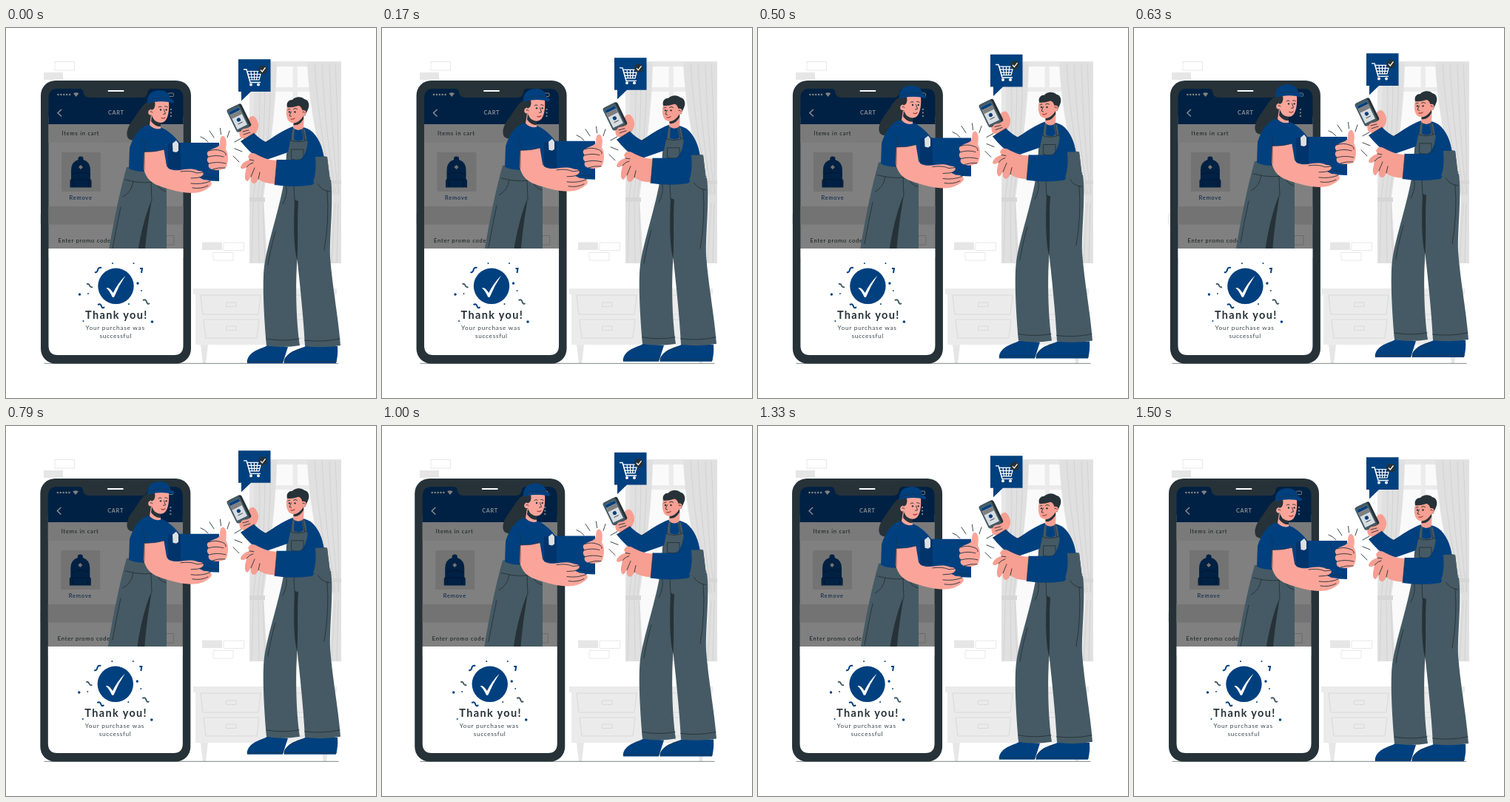
These frames come from a looping animation (500 by 500 pixels, 1540 ms). An HTML page:

```html
<!DOCTYPE html>
<html lang="en">
<head>
<meta charset="utf-8">
<title>Order complete</title>
<style>
  html, body { margin: 0; width: 100%; height: 100%; overflow: hidden; background: #fff; }
  svg { display: block; width: 100vw; height: 100vh; }
  text { font-family: Lato, "Open Sans", sans-serif; }
  .navy { fill: #00407f; }
  .dark { fill: #263238; }
  .cloth { fill: #455a64; }
  .skin { fill: #fba59a; }
  .tan { fill: #f69f92; }
  .white { fill: #fff; }
  .ink { fill: none; stroke: #263238; stroke-width: .9; stroke-linecap: round; stroke-linejoin: round; }
  .thin { stroke-width: .6; }
  .pale { fill: #fff; stroke: #e6e6e6; stroke-width: .9; }
  .drape { fill: #e0e0e0; }
  .fold { fill: none; stroke: #cfcfcf; stroke-width: .8; }
  .lip { fill: none; stroke: #a83c3a; stroke-width: 1.3; stroke-linecap: round; }
  .curl { fill: none; stroke-width: 2; stroke-linecap: butt; }
  .small { font-size: 7.5px; fill: #12191c; letter-spacing: .78px; }
  .note { font-size: 8.3px; fill: #3b474d; }
</style>
</head>
<body>
<svg viewBox="0 0 500 500" xmlns="http://www.w3.org/2000/svg">
  <!-- room -->
  <g>
    <path class="pale" d="M66 45.500H92.500V57H66ZM294 290H321.500V300.500H294ZM280 303.500H307V314H280ZM46.500 252H60V265H46.500Z"/>
    <path fill="#e6e6e6" d="M51 60H77V70H51ZM265 289.500H292V300H265Z"/>
    <path fill="#e6e6e6" d="M329 45H453V318H329Z"/>
    <path fill="#fafafa" d="M345 52H443V308H345Z"/>
    <path fill="#ebebeb" d="M387.500 52H394V308H387.500ZM345 80H443V86H345ZM337 228H345V236H337Z"/>
    <path class="drape" d="M334 46H366C365 105 357 165 348 228L353 318H329V232Q338 140 334 46Z"/>
    <path class="drape" d="M407 46H452.500V318H437L442 228C424 176 410 112 407 46Z"/>
    <path class="fold" d="M342 48Q346 150 334 230M350 48Q351 150 340 230M358 48Q357 150 345 229M334 236L332 317M341 236L342 317M347 236L350 317M417 48Q424 152 444 225M427 48Q432 150 446 225M437 48Q440 150 449 225M445 48Q449 130 450 225M445 236L440 317M449 236L447 317"/>
    <path fill="#d6d6d6" d="M329 229H350V235H329ZM440 206H453V211H440Z"/>
    <path fill="#e6e6e6" d="M263 428H273L270 453H266ZM425 428H437L433 453H429Z"/>
    <path fill="#ebebeb" d="M253 352H447V360H445V428H256V360H253Z"/>
    <path fill="none" stroke="#d9d9d9" d="M263 361H344L341 387H266ZM267 394H342L339 419H270ZM297.500 371H311V376.500H297.500ZM297.500 403H311V408.500H297.500ZM357 361H437L434 387H360ZM360 394H434L432 419H363Z"/>
    <path class="ink thin" d="M52 453.300H449"/>
  </g>

  <!-- handset -->
  <g class="shake">
    <rect class="dark" x="47" y="71" width="203" height="382.500" rx="20"/>
    <path fill="#808080" d="M57.500 120H239.500V310H57.500Z"/>
    <path fill="#002143" d="M57.500 130V95Q57.500 82 70 82H99Q104 82 104.500 87Q105.500 94 113 94H184Q190.500 94 191.500 87Q192 82 197 82H227Q239.500 82 239.500 95V130Z"/>
    <path fill="#7a7a7a" d="M57.500 130H239.500V155H57.500Z"/>
    <path fill="#737373" d="M57.500 241H239.500V265.500H57.500ZM75 168H128V221H75Z"/>
    <path d="M138.500 85H158.500" stroke="#fff" stroke-width="2" stroke-linecap="round"/>
    <path d="M70.500 90H88" stroke="#808080" stroke-width="2.600" stroke-dasharray="0 3.900" stroke-linecap="round"/>
    <path fill="#808080" d="M91 88.500Q94.700 86 98.400 88.500L94.700 93Z"/>
    <rect x="219.500" y="88" width="7" height="4.500" rx="1" fill="none" stroke="#808080"/>
    <path d="M75 110L70 114.700L75 119.500" fill="none" stroke="#8a8f96" stroke-width="1.400"/>
    <path d="M223 109V122" stroke="#808080" stroke-width="2" stroke-dasharray="2 2.500"/>
    <text x="138" y="117.300" font-size="7.300" letter-spacing=".7" fill="#8a8f96" font-weight="700">CART</text>
    <text class="small" x="75.500" y="145">Items in cart</text>
    <text class="small" x="85.500" y="231.500" style="fill:#002143">Remove</text>
    <text class="small" x="70.500" y="289.700">Enter promo code</text>
    <path fill="none" stroke="#666" stroke-width=".8" d="M190 280.500H227V293H190Z"/>
    <!-- backpack -->
    <path fill="#002143" d="M97.500 178V176Q97.500 173.500 101 173.500T104.500 176V178Q114 181 114 192V204L115.500 206V215.500H86.500V206L88 204V192Q88 181 97.500 178Z"/>
    <path d="M89 198Q101 192 113 198M88 205H114M91 207V214M111 207V214" fill="none" stroke="#001026" stroke-width=".7"/>
    <path fill="#737373" d="M101 185L104 188L101 191L98 188Z"/>
  </g>

  <!-- courier -->
  <g class="float">
    <path class="cloth" d="M163 188C154 220 145 262 137 312H217V222L215 186Z"/>
    <path class="dark" d="M197 232C188 252 180 286 177 312H187C189 282 193 256 197 232Z"/>
    <path class="ink" d="M161 205Q188 213 214 205M196 208L197 234M172 207Q170 222 158 228M204 208Q205 218 216 221M155 242Q149 270 144 298"/>
    <path class="dark" d="M196 98C186 100 180 112 173 122C165 132 161 142 165 149C172 156 195 150 204 133Z"/>
    <!-- far sleeve and torso -->
    <path class="navy" d="M208 134C218 137 228 146 235 156L219 168V188L186 194Q174 194 166 190L167 162C172 147 179 136 190 131Z"/>
    <path class="skin" d="M196 118L194 131Q200 138 209 136L209 126Z"/>
    <path class="dark" d="M197 119L196 126Q202 134 209 133V127Z"/>
    <path class="skin" d="M196 99C194 108 196 119 201 125Q207 129.500 213 127C219 124 221 111 220 99Z"/>
    <circle class="skin" cx="196" cy="114" r="3.800"/>
    <path class="dark" d="M192 100Q193 96 200 98Q203 103 200 109L197 111Q193 108 192 100Z"/>
    <path class="navy" d="M191 102C190 91 196 85 206 84.300C215 83.500 221 88 222 95L226.500 98Q228.500 100 225 101.500C214 98 202 99 191 102Z"/>
    <path class="ink thin" d="M192 98Q208 92 222 95"/>
    <path class="ink" d="M206 107Q208 105 210 106.500M214.500 106Q216.500 105 218.500 107M213.500 110L215.500 116L212.500 116.500M195 113Q196 112 198 114"/>
    <circle class="dark" cx="209" cy="110.500" r="1.200"/><circle class="dark" cx="216.700" cy="110.500" r="1.200"/>
    <path class="lip" d="M210 121.500Q212.500 123 215 121"/>

    <!-- parcel -->
    <path class="navy" d="M219 156L236 155H288V207L262 206L219 190Z"/>
    <path fill="#00346b" d="M219 156L236 155V192L219 190Z"/>
    <path fill="#dce0e4" d="M225 156L230 152L233 156V166L230 168L225.500 167Z"/>
    <path class="ink thin" d="M268 201L286 203"/>
    <path class="skin" d="M187 164L186 190C189 203 196 209 206 213C222 219 239 223 251 223C261 223 270 220 277 213C280 208 275 205 267 205L261 202C269 199 269 193 260 193C252 189 241 191 235 192C224 193 219 191 217 186L213 162Z"/>
    <path class="navy" d="M184 148L210 146L214.500 164Q201 168 186.500 167.500Z"/>
    <path class="ink thin" d="M187 191V160Q188 154 185 149M187 167.500Q201 168 214.500 164"/>
    <path class="ink" d="M236 194Q249 192 258 196L267 195M250 203Q259 203 265 201M250 210Q264 212 276 207M252 216Q264 218 273 213"/>
    <path class="skin" d="M274 166C281 161 289 162 289 155C289 149 291 145 294 146C299 149 298 158 297 164C301 169 301 182 297 189C291 193 281 193 276 190C273 188 273 184 275 183C271 181 271 176 274 174C271 171 271 168 274 166Z"/>
    <path class="ink" d="M274 166Q283 163 291 166Q298 168 297 172M274 174Q284 171 294 174M275 183Q285 180 297 183M279 191Q288 188 296 189"/>
    <path class="ink" d="M263 147Q269 149 273 154M275 139L281 148M289.500 135.500L290.500 144M302 139L299 148M309 154L318 149M309 163L319 167M307 173L315 181"/>
  </g>

  <!-- receipt card -->
  <g class="shake">
    <path class="white" d="M57.500 298H239.500V429Q239.500 442 227 442H70Q57.500 442 57.500 429Z"/>
    <circle class="navy" cx="148.500" cy="348.800" r="24.200"/>
    <path class="white" d="M135.500 351.500Q139 349 144.700 358Q151 345 161.500 334.500Q152.500 348 146 363.800H143.800Q140 355 135.500 351.500Z"/>
    <g class="curl" stroke="#00407f">
      <path d="M120 330Q123 331 124 327T129 324M181 325L184 325L183 331M124 374Q128 372 129 376T133 377"/>
    </g>
    <g class="curl" stroke="#455a64">
      <path d="M109 346Q112 345 113 348T117 350M185 368Q189 366 190 370T194 372"/>
    </g>
    <g class="navy">
      <circle cx="144" cy="318" r="1"/><circle cx="172.500" cy="318" r="1"/><circle cx="178" cy="345" r="1.700"/>
      <circle cx="99.500" cy="360" r="1.700"/><circle cx="197.500" cy="397" r="1.800"/><circle cx="166" cy="373" r="1"/>
      <circle cx="104.500" cy="396" r="1"/><circle cx="183" cy="355" r=".9"/><circle cx="111" cy="359" r=".9"/>
    </g>
    <text x="107" y="393" font-size="14.500" font-weight="700" letter-spacing="1.350" fill="#263238">Thank you!</text>
    <text class="note" x="107.500" y="408.300" letter-spacing=".75">Your purchase was</text>
    <text class="note" x="126.500" y="418.800" letter-spacing=".65">successful</text>
  </g>

  <!-- customer -->
  <g class="float">
    <path class="navy" d="M353 429C345 434 335 434 328 444Q325 449 326 453H374L381 431Z"/>
    <path class="navy" d="M405 430C396 434 384 436 378 445Q375 449 376 453H446Q449 442 448 430Z"/>
    <path class="ink thin" d="M327 450.500H374M377 450.500H447M345 434L349 439M394 434L398 439M376 453Q375 449 378 445Q386 436 400 433"/>
    <path class="cloth" d="M376 205L439 205C443 235 437 280 438 310C441 350 449 390 452 429Q428 433 404 430C402 390 397 345 393.500 312C391 348 392 395 397 429Q373 433 352 429C349 395 346 345 349 322C353 292 371 240 376 205Z"/>
    <path class="dark" d="M390 232L395 234C393 260 395 288 393.500 314C388 294 389 258 390 232Z"/>
    <path class="ink" d="M352 420Q374 424 396 420M403.500 422Q428 425 451 420M434 220Q437 260 430 300M378 210Q382 224 374 238M389 212L390 234M420 208Q425 220 438 221M364 275Q357 300 354 320"/>
    <path class="navy" d="M386 135C394 131 404 134 411 138C422 146 428 161 430 177V205H377L379 172Z"/>
    <path class="cloth" d="M381 150L386 137L390 135L389 151Q397 155 402 150L399 135L404 137L407 153Q413 171 434 174L438 207Q408 216 376 208L379 177Z"/>
    <path class="ink" d="M382 151Q395 157 407 151M378 203Q408 212 438 203M386 137L385 152M401 137L404 152M386 164H402V177Q394 181 386 177Z"/>
    <path class="tan" d="M389 120L388 135Q395 141 402 135L403 116Z"/>
    <path class="dark" d="M389 125L388.500 131Q396 133 402 123V117Z"/>
    <path class="tan" d="M381 103C377.500 112 378.500 121 382 125.500Q386 130 393 127.500C400 124 405 116 405 107L399 100Z"/>
    <path class="dark" d="M380 107C378 100 383 97 387 97C391 92.500 399 92 403 96C409 97 411 104 408 110L404 119L401 113Q399 105 395 105Q386 108 380 107Z"/>
    <circle class="tan" cx="402" cy="114.500" r="3.600"/>
    <path class="ink" d="M381 110.500Q383 108.500 384 109.500M388.500 109.500Q391 107.500 393.500 109.500M385.500 113L383 118.500L385.500 119.500M401 113.500Q403 112.500 404 114.500"/>
    <circle class="dark" cx="383" cy="113.500" r="1.200"/><circle class="dark" cx="390.500" cy="113.500" r="1.200"/>
    <path class="lip" d="M385 123Q387.500 124 390 122"/>

    <!-- raised arm -->
    <path class="tan" d="M317 148C313 140 316 132 325 127L329 121Q334 117 337 121C342 128 343 134 337 143L329 153Z"/>
    <path class="navy" d="M388 133C374 138 362 147 351 154Q343 150 335 142L317 153Q329 168 341 176Q349 180 358 176L381 168Z"/>
    <path class="ink thin" d="M335 142L318 153M351 154L357 152"/>
    <g transform="translate(314 122) rotate(-26)">
      <rect class="dark" x="-9" y="-17" width="21" height="34" rx="3"/>
      <rect x="-10" y="-17" width="19" height="34" rx="3" class="cloth"/>
      <path fill="#d8dde2" d="M-8-13H7V13H-8Z"/>
      <path class="navy" d="M-8-13H7V-9H-8Z"/>
      <path fill="#808080" d="M-8-9H7V-3H-8Z"/>
      <circle class="navy" cx="-.5" cy="2" r="2.600"/>
      <path d="M-4 7H3" stroke="#263238" stroke-width=".8"/>
    </g>
    <path class="tan" d="M318 143Q316 137 322 136L329 135Q332 137 328 139L331 140Q331 144 325 145Z"/>
    <path class="ink" d="M320 140L328 138M321 144L330 141"/>

    <!-- lowered arm -->
    <path class="tan" d="M367 179C354 179 344 174 337 170Q330 167 327 174L329 178C322 180 317 185 317 189Q320 192 325 188L323 198Q322 207 327 207L331 200Q330 209 334 210Q338 211 341 204Q347 210 366 211Z"/>
    <path class="ink" d="M325 188Q329 183 334 182M331 201L336 189M341 204L343 195M329 178L335 179"/>
    <path class="navy" d="M409 139C422 146 429 163 429 177C428 190 421 203 414 212Q389 216 363 212L366 178L397 178Q408 172 409 139Z"/>
    <path class="cloth" d="M418 174L434 174L438.500 212L415 208Q420 195 418 174Z"/>
    <path class="ink thin" d="M366 178L363 212M386 178L397 178Q405 175 407 169"/>
  </g>

  <!-- notice -->
  <g class="float">
    <path class="navy" d="M314 42.300H357.500V86H331L318 98.500V86H314Z"/>
    <path d="M321 56H325L330 73.500H344" fill="none" stroke="#fff" stroke-width="1.400"/>
    <path d="M326 58.500H345L342 70H329ZM327 62.500H344M328 66.500H343M331 58.500L332.500 70M335.500 58.500V70M340 58.500L338.500 70" fill="none" stroke="#fff" stroke-width="1.200"/>
    <circle class="white" cx="331" cy="76.500" r="2"/><circle class="white" cx="341" cy="76.500" r="2"/>
    <circle class="dark" cx="347" cy="56.500" r="6"/>
    <path d="M344 56.500L346.300 59L350.500 53.500" fill="none" stroke="#fff" stroke-width="1.300"/>
  </g>
</svg>
<script>
  const LOOP = 1540, FPS = 24, STEPS = 36, LIFT = 9.7;
  const SHAKE = [0, -1, 2, -4, 4, -4, 4, -4, 2, -1, 0];
  const shaken = document.querySelectorAll('.shake');
  const floating = document.querySelectorAll('.float');

  // cubic-bezier(0, 0, .58, 1), solved for x by bisection
  function easeOut(x) {
    let lo = 0, hi = 1;
    for (let i = 0; i < 20; i++) {
      const s = (lo + hi) / 2;
      if (1.74 * s * s * (1 - s) + s * s * s < x) lo = s; else hi = s;
    }
    return 3 * lo * lo - 2 * lo * lo * lo;
  }

  function shakeAt(p) {
    const pos = p * 10, i = Math.min(9, Math.floor(pos));
    return SHAKE[i] + (SHAKE[i + 1] - SHAKE[i]) * easeOut(pos - i);
  }

  function move(nodes, x, y) {
    nodes.forEach(n => n.setAttribute('transform', `translate(${x.toFixed(2)} ${y.toFixed(2)})`));
  }

  function draw(now) {
    const step = Math.floor((now % LOOP + 5) * FPS / 1000);
    const p = Math.min(step, STEPS) / STEPS;
    move(shaken, shakeAt(p), 0);
    move(floating, 0, -LIFT * (1 - Math.abs(2 * p - 1)));
  }

  function tick() {
    draw(performance.now());
    requestAnimationFrame(tick);
  }
  tick();
</script>
</body>
</html>
```
